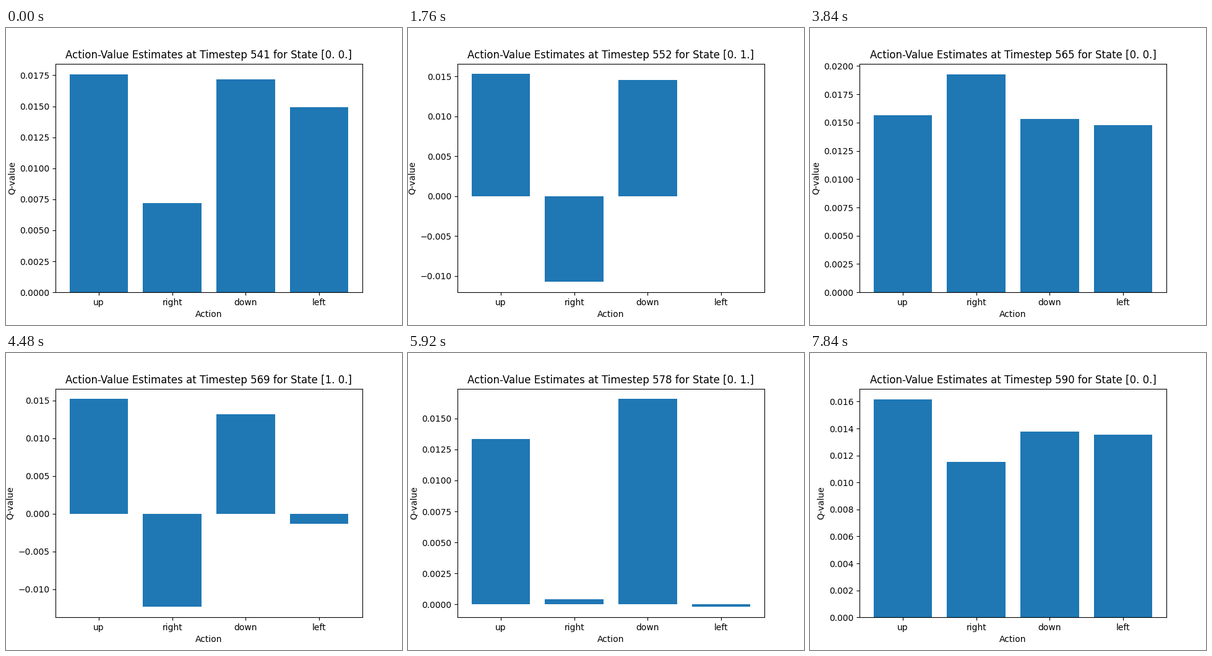
Animation of 640 by 480 pixels, one loop 8000 ms. Source, as a matplotlib script:

```python
import numpy as np
import matplotlib.pyplot as plt
from matplotlib.animation import FuncAnimation

plt.rcParams["font.family"] = "DejaVu Sans"

ACTIONS = ["up", "right", "down", "left"]
FIRST_STEP = 541

# Grid cell visited at each timestep
CELLS = {"A": (0, 0), "B": (0, 1), "C": (1, 0)}
WALK = "AAABBAAA" "AABBBAA" "AACCAAA" "AAAAACC" "CAAAAAA" "BBAACCA" "AAACAAA"

# Q-values (in thousandths) of each cell at known timesteps
ESTIMATES = {
    "A": {541: (17.56, 7.20, 17.18, 14.93),
          561: (16.05, 21.55, 15.37, 15.25),
          584: (13.59, 8.28, 15.08, 12.52),
          590: (16.15, 11.52, 13.77, 13.54)},
    "B": {552: (15.29, -10.73, 14.54, 0.0),
          578: (13.34, 0.40, 16.57, -0.21)},
    "C": {569: (15.20, -12.34, 13.18, -1.33)},
}


def q_values(cell, step):
    known = ESTIMATES[cell]
    times = list(known)
    return [np.interp(step, times, q) / 1000 for q in zip(*known.values())]


fig, ax = plt.subplots(figsize=(6.4, 4.8), dpi=100)


def draw(i):
    step, cell = FIRST_STEP + i, WALK[i]
    state = np.array(CELLS[cell], dtype=float)
    ax.clear()
    ax.bar(ACTIONS, q_values(cell, step))
    ax.set_xlabel("Action")
    ax.set_ylabel("Q-value")
    ax.set_title(f"Action-Value Estimates at Timestep {step} for State {state}")


anim = FuncAnimation(fig, draw, frames=len(WALK), interval=160,
                     init_func=lambda: None, repeat=True, repeat_delay=0)
plt.show()
```
